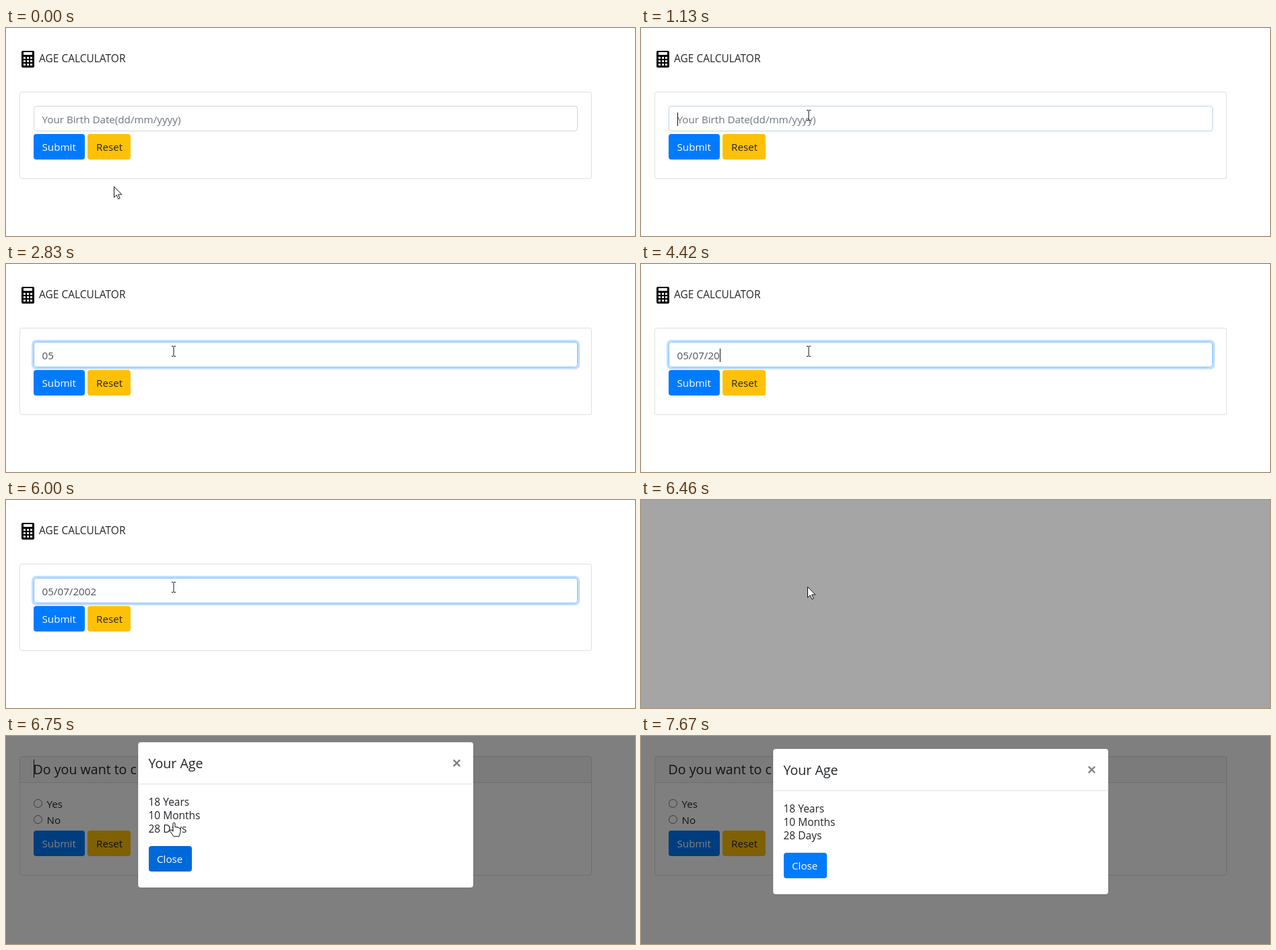
An HTML page for the animation above (8000 ms loop, 934 by 310 pixels).

```html
<!DOCTYPE html>
<html lang="en">
<head>
<meta charset="utf-8">
<title>Age calculator</title>
<style>
html, body { margin: 0; width: 100%; height: 100%; overflow: hidden; background: #fff; }
svg { display: block; width: 934px; height: 310px; }
text { font: 15.2px "Open Sans", "Noto Sans", sans-serif; fill: #212529; }
.bold { font-weight: 500; font-size: 15.5px; }
.title { font-weight: 500; font-size: 19.6px; }
.box { fill: none; stroke: #000; stroke-opacity: .125; }
.white { fill: #fff; }
.blue { fill: #007bff; }
.amber { fill: #ffc107; }
.caret { stroke: #111; }
.arrow { fill: #fff; stroke: #111; stroke-linejoin: round; }
</style>
</head>
<body>
<svg viewBox="0 0 934 310">
  <defs>
    <g id="buttons">
      <rect class="blue" x="41" width="76" height="38" rx="4"/>
      <text class="white" x="53.5" y="25">Submit</text>
      <rect class="amber" x="121" width="64" height="38" rx="4"/>
      <text x="134" y="25">Reset</text>
    </g>
  </defs>
  <rect width="934" height="310" fill="#fff"/>

  <g id="form">
    <rect x="23" y="34" width="19" height="25" rx="2"/>
    <path id="keys" fill="#fff"/>
    <text class="bold" x="49" y="51">AGE CALCULATOR</text>
    <rect class="box" x="20.5" y="95.5" width="849" height="129" rx="3"/>
    <rect id="glow" x="39.5" y="114.5" width="811" height="41" rx="5.5" fill="none" stroke="#007bff" stroke-opacity=".25" stroke-width="3"/>
    <rect id="field" x="41.5" y="116.5" width="807" height="37" rx="4" fill="none"/>
    <text id="value" x="53.5" y="142"></text>
    <path id="caret" class="caret" d="M0 126v20"/>
    <use href="#buttons" y="158"/>
  </g>

  <g id="result">
    <rect x="20.5" y="30.5" width="849" height="39" fill="#000" fill-opacity=".03"/>
    <rect class="box" x="20.5" y="30.5" width="849" height="177" rx="4"/>
    <path class="box" d="M21 69.5h848"/>
    <text class="title" x="40.5" y="57">Do you want to c</text>
    <path id="headCaret" class="caret" d="M41.5 35v27"/>
    <g fill="#fff" stroke="#767676">
      <circle cx="47.5" cy="100.5" r="6"/>
      <circle cx="47.5" cy="124.5" r="6"/>
    </g>
    <text x="60.5" y="107">Yes</text>
    <text x="60.5" y="131">No</text>
    <use href="#buttons" y="141"/>
  </g>

  <rect id="shade" width="934" height="310"/>

  <g id="modal">
    <rect x="196" width="498" height="217" rx="4" fill="#fff" stroke="#000" stroke-opacity=".2"/>
    <text class="title" x="211.5" y="39">Your Age</text>
    <path d="M664.5 26.500l9.500 9.500m0-9.500l-9.500 9.500" stroke="#808080" stroke-width="2.4"/>
    <path d="M197 62.5h496" stroke="#dee2e6"/>
    <text class="bold" x="211.5" y="95">18 Years</text>
    <text class="bold" x="211.5" y="115">10 Months</text>
    <text class="bold" x="211.5" y="135">28 Days</text>
    <rect id="close" x="212" y="155" width="64" height="38" rx="4"/>
    <text class="white" x="224" y="180">Close</text>
  </g>

  <g id="pointer">
    <path id="arrow" class="arrow" d="M.5.5v16l3.7-3.5 2.6 5.8 2.4-1-2.6-5.7h5.2z"/>
    <path id="beam" d="M-1-6.5h2.5m1 0h2.5M2-6v14M-1 8.5h2.5m1 0h2.5" fill="none" stroke="#111"/>
    <path id="hand" class="arrow" d="M1 1q1.500-2 3 0v6q2-1.500 3 .5 2-1 3 .7 2.500 0 2 2.500v4l-2 6H2l-5.500-8q0-2.500 2.500-1.500l2 2z"/>
  </g>
</svg>
<script>
const LOOP = 8000, FOCUS = 1115, SUBMIT = 6270, SHADE = 6355, MODAL = 6570;
const DATE = "05/07/2002";
const KEY_TIMES = [2040, 2330, 3000, 3250, 3500, 3790, 4210, 4420, 4580, 5210];
const el = Object.fromEntries([...document.querySelectorAll("[id]")].map(e => [e.id, e]));
const ramp = (t, start, length) => Math.min(1, Math.max(0, (t - start) / length));
const mix = (a, b, p) => a + (b - a) * p;
const blend = (a, b, p) => `rgb(${a.map((v, i) => Math.round(mix(v, b[i], p)))})`;
const show = (node, on) => node.style.display = on ? "" : "none";

let keys = "M26 36h13v4h-13z";
for (let i = 0; i < 9; i++) keys += `M${26 + i % 3 * 5} ${43 + Math.floor(i / 3) * 5}h3v3h-3z`;
el.keys.setAttribute("d", keys);

function drawForm(t) {
  const focus = ramp(t, FOCUS, 150);
  const typed = KEY_TIMES.filter(k => k <= t).length;
  el.value.textContent = typed ? DATE.slice(0, typed) : "Your Birth Date(dd/mm/yyyy)";
  el.value.style.fill = typed ? "#495057" : "#6c757d";
  el.glow.style.opacity = focus;
  el.field.style.stroke = blend([206, 212, 218], [128, 189, 255], focus);
  const since = t - (typed ? KEY_TIMES[typed - 1] : FOCUS);
  show(el.caret, since >= 0 && since % 1000 < 500);
  const x = typed ? 54 + el.value.getComputedTextLength() : 54;
  el.caret.setAttribute("transform", `translate(${Math.round(x) + .5})`);
}

function drawModal(t) {
  const slide = 1 - (1 - ramp(t, MODAL, 300)) ** 1.75;
  show(el.modal, t >= MODAL);
  el.modal.setAttribute("transform", `translate(0 ${mix(-31, 19, slide)})`);
  el.modal.style.opacity = ramp(t, MODAL, 150);
  el.close.style.fill = blend([0, 105, 217], [0, 123, 255], ramp(t, 6780, 150));
}

function drawPointer(t) {
  const p = ramp(t, 40, 750), ease = p * p * (3 - 2 * p);
  const x = Math.round(mix(160, 247, ease)), y = Math.round(mix(236, 129, ease));
  el.pointer.setAttribute("transform", `translate(${x} ${y})`);
  const beam = t < SUBMIT && y < 154, hand = t >= MODAL;
  show(el.pointer, t < 7020);
  show(el.beam, beam);
  show(el.hand, hand);
  show(el.arrow, !beam && !hand);
}

function frame(now) {
  const t = now % LOOP;
  show(el.form, t < SUBMIT);
  show(el.result, t >= 6500);
  show(el.headCaret, t < 7080);
  el.shade.style.opacity = ramp(t, SHADE, 150) / 2;
  drawForm(t);
  drawModal(t);
  drawPointer(t);
  requestAnimationFrame(frame);
}
frame(performance.now());
</script>
</body>
</html>
```
